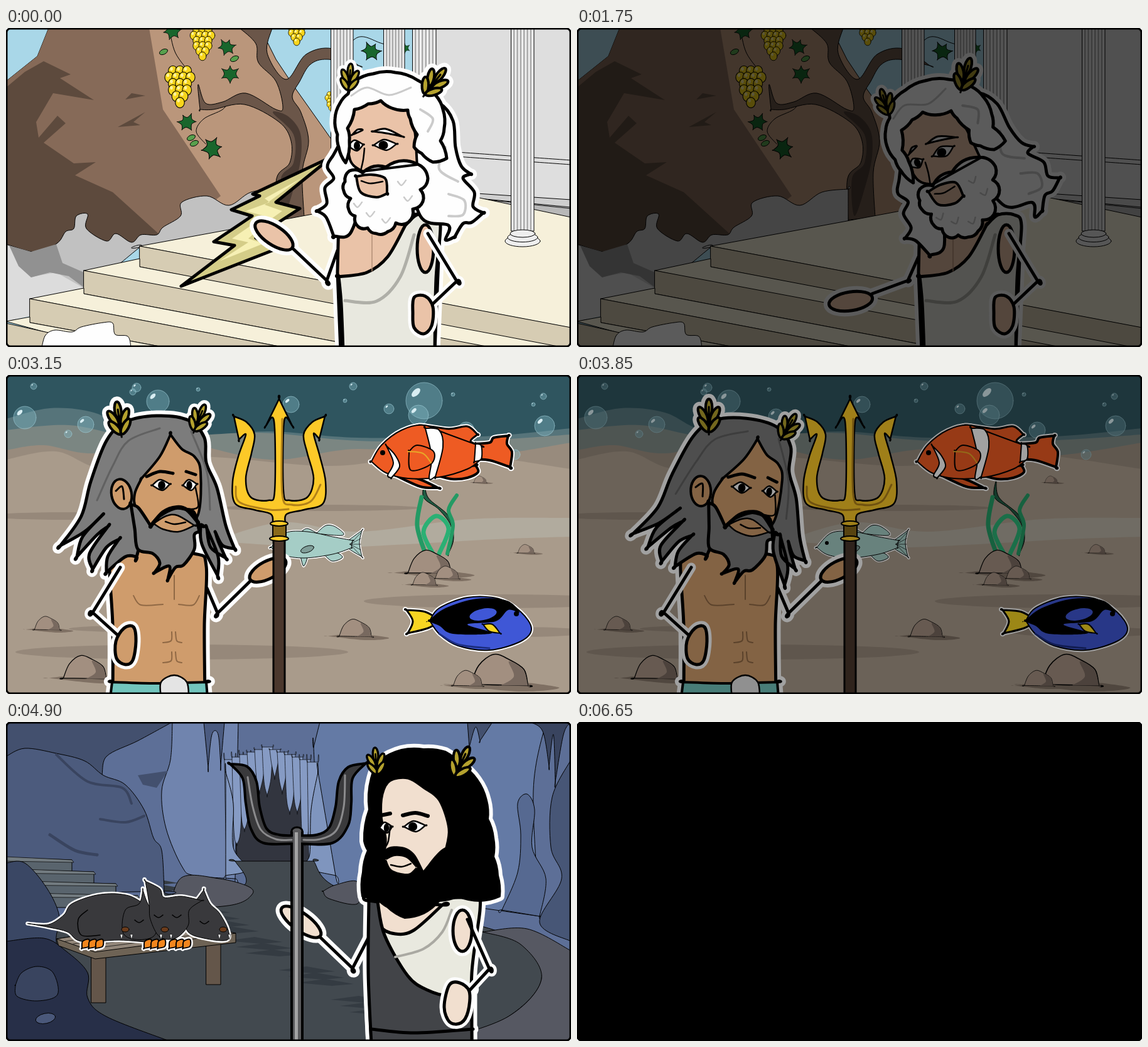
Animation of 900x509 px, one loop 7000 ms. Source, as an HTML page with a canvas:

```html
<!DOCTYPE html>
<html>
<head>
<meta charset="utf-8">
<style>
html, body { margin: 0; width: 100%; height: 100%; overflow: hidden; background: #fff; }
canvas { display: block; }
</style>
</head>
<body>
<canvas id="stage" width="900" height="509"></canvas>
<script>
const ctx = document.getElementById('stage').getContext('2d');
const INK = '#000', WHITE = '#fefefe';
let halo = 0;
ctx.lineJoin = ctx.lineCap = 'round';

// Points are "x,y"; a trailing "!" makes a sharp corner.
const points = d => d.split(' ').flatMap(s => {
  const p = s.replace('!', '').split(',').map(Number);
  return s.endsWith('!') ? [p, p] : [p];
});

function paint(path, fill, width, ink = INK) {
  if (halo) {
    if (!width) return;
    fill = null; ink = WHITE; width += halo * 2;
  }
  if (fill) { ctx.fillStyle = fill; ctx.fill(path); }
  if (width) { ctx.lineWidth = width; ctx.strokeStyle = ink; ctx.stroke(path); }
}

function spline(d, closed) {
  const p = points(d), n = p.length, path = new Path2D();
  const get = i => p[closed ? (i + n) % n : Math.max(0, Math.min(n - 1, i))];
  path.moveTo(...p[0]);
  for (let i = 0; i < n - !closed; i++) {
    const [a, b, c, e] = [get(i - 1), get(i), get(i + 1), get(i + 2)];
    path.bezierCurveTo(b[0] + (c[0] - a[0]) / 6, b[1] + (c[1] - a[1]) / 6,
      c[0] - (e[0] - b[0]) / 6, c[1] - (e[1] - b[1]) / 6, ...c);
  }
  if (closed) path.closePath();
  return path;
}

const blob = (d, fill, width = 1) => paint(spline(d, true), fill, width);
const line = (d, width = 1, ink) => paint(spline(d, false), null, width, ink);
const poly = (d, fill, width = 1) => paint(new Path2D(`M${d}Z`), fill, width);
const rect = (x, y, w, h, fill, width = 0) => poly(`${x},${y}h${w}v${h}h${-w}`, fill, width);

function puff(d, fill, width, bulge) {
  const p = points(d), path = new Path2D();
  path.moveTo(...p[0]);
  p.forEach(([x, y], i) => {
    const [u, v] = p[(i + 1) % p.length];
    path.quadraticCurveTo((x + u) / 2 + (v - y) * bulge, (y + v) / 2 - (u - x) * bulge, u, v);
  });
  paint(path, fill, width);
}

function oval(x, y, rx, ry, fill, width = 0, deg = 0, ink) {
  const path = new Path2D();
  path.ellipse(x, y, rx, ry, deg * Math.PI / 180, 0, 7);
  paint(path, fill, width, ink);
}

function place(x, y, deg, scale, fn) {
  ctx.save();
  ctx.translate(x, y);
  ctx.rotate(deg * Math.PI / 180);
  ctx.scale(scale, scale);
  fn();
  ctx.restore();
}
const shift = (x, y, fn) => place(x, y, 0, 1, fn);
const turn = (x, y, deg, fn) => place(x, y, deg, 1, () => shift(-x, -y, fn));

function outlined(size, fn) {
  halo = size; fn();
  halo = 0; fn();
}

function laurel(x, y, deg, scale) {
  place(x, y, deg, scale, () => {
    for (const [u, v, a] of [[0, -19, 0], [-9, -8, -28], [9, -8, 28], [-8, 7, -36], [8, 7, 36]])
      oval(u, v, 5, 13, '#b5a22e', 4, a);
    line('0,-20 0,22', 3);
  });
}

function eye(x, y, rx, look) {
  blob(`${x - rx},${y}! ${x - 2},${y - 9} ${x + rx},${y - 2}! ${x + 2},${y + 8}`, WHITE, 2.5);
  oval(x + look, y, rx * .42, 7, INK);
}

// ---------- sky scene ----------
function grapes(x, y, s) {
  place(x, y, 0, s, () => [3, 4, 3, 3, 2, 1].forEach((n, row) => {
    for (let i = 0; i < n; i++) {
      const u = (i - (n - 1) / 2) * 10, v = row * 9 - 20;
      oval(u, v, 6.5, 7.5, '#f8d51c', 1);
      oval(u - 2, v - 3, 2, 2.5, '#fff3a0');
    }
  }));
}

const vineLeaf = (x, y, deg, s) => place(x, y, deg, s, () =>
  blob('0,-14! 5,-7 15,-9! 11,0 15,8! 6,8 0,17! -6,8 -15,8! -11,0 -15,-9! -5,-7', '#19662c'));

function column(x, w, bottom) {
  rect(x, -2, w, bottom + 2, '#f0f0f0', 1);
  for (let i = 0; i < 6; i++) rect(x + 3 + i * (w - 4) / 6, 0, 2.5, bottom, '#aaa');
  for (const i of [2, 1, 0]) oval(x + w / 2, bottom + 4 + i * 6, 20 + i * 4, 6 + i * 1.5, '#eee', 1);
}

function olympus() {
  const sky = '#a9d7e8', shade = '#5d4a3d', top = '#f6f0da', side = '#d6ccb3';
  rect(0, 0, 900, 509, sky);
  poly('0,85 50,45 68,0 405,0 430,50 460,95 520,180 520,310 0,360', '#ba967b');
  poly('0,85 50,45 68,0 228,0 250,130 342,268 240,345 0,360', '#866a58', 0);
  poly('0,95 30,70 60,53 103,74 86,80 140,115 75,104 48,150 52,175 82,140 95,152 60,183 108,216 143,214 110,235 170,262 245,330 200,346 110,340 60,365 0,345', shade, 0);
  poly('200,104 222,108 190,114', shade, 0);
  poly('178,158 222,134 203,150 214,155', shade, 0);
  rect(518, 0, 382, 305, '#dedede');
  rect(553, 0, 50, 290, sky);
  rect(635, 0, 14, 290, sky);
  line('690,196 900,211');
  line('690,203 900,218');
  poly('690,260 900,274 900,286 690,266', '#cfcfcf');
  poly('690,266 900,288 900,304 690,288', '#b8b8b8');
  line('260,0 270,40 296,75');
  line('355,115 345,130 315,145 303,165 318,185');
  line('525,55 560,15 600,25 640,35');
  blob('432,306! 431,240 452,215 454,180 435,150 380,122 330,130 309,130! 306,90 318,120 345,118 382,104 430,130 441,126 430,85 402,55 398,25 372,0! 424,0! 416,40 446,82 478,42 520,33 562,60! 512,50 485,58 468,85 456,110 470,135 482,180 472,230 475,303!', '#6b5649');
  blob('460,250 470,205 468,165 448,140 425,135 458,170 458,215 438,240 442,300', '#493a32', 0);
  grapes(313, 22, .92); grapes(277, 91, 1.12); grapes(463, 2, .8); grapes(521, 118, .6);
  vineLeaf(265, 5, 20, .8); vineLeaf(352, 30, 20, .8); vineLeaf(357, 73, 0, .85); vineLeaf(288, 150, -30, .85);
  vineLeaf(329, 192, 80, 1); vineLeaf(582, 37, 30, .9); vineLeaf(635, 32, 0, .5);
  for (const [x, y] of [[251, 38], [364, 49], [295, 175], [300, 184]]) oval(x, y, 7, 4, '#58a04d', 1, -25);
  blob('0,345! 50,358 82,343 95,325 108,320 112,300 130,297 128,320 160,340 175,328 200,342 215,330 240,330 250,318 278,300 280,278 320,268 355,283 390,262 432,257! 432,312! 213,350! 120,420 0,470!', '#c1c1c1');
  poly('0,346 20,355 20,378 40,397 80,390 124,415 38,460 0,468', '#dcdcdc', 0);
  poly('5,347 40,357 80,345 90,375 124,390 124,414 100,396 70,390 40,398 20,380', '#919191', 0);
  column(518, 35, 290); column(602, 33, 280); column(648, 37, 280);
  poly('213,348 430,308 520,291 740,268 900,302 900,478', top);
  poly('213,348 900,478 900,515 213,381', side);
  poly('124,387 213,368 213,381 900,512 740,509', top);
  poly('124,387 770,509 570,509 124,424', side);
  poly('38,432 124,415 124,424 570,509 440,509', top);
  poly('38,432 440,509 250,509 38,470', side);
  poly('0,468 38,461 38,470 250,509 150,509', top);
  poly('0,471 170,509 0,509', side);
  column(805, 36, 324);
  blob('57,509! 63,490 78,482 105,485 120,477 155,470 170,471 174,489 194,492 199,509!', WHITE);
}

function bolt() {
  poly('520,205 393,265 404,268 359,290 392,300 331,341 364,347 279,412 432,352 398,335 422,318 468,288 430,278', '#d4cd88', 5);
  poly('470,240 412,272 420,278 382,292 412,300 360,336 386,342 340,372 410,344 386,336 412,312 440,292 412,282', '#f6f0b4', 0);
}

function zeusHead() {
  const skin = '#eac3a8', grey = '#cbcbcb';
  blob('655,115 690,120 712,148 716,190 725,220 740,233! 728,240 746,262 744,285 760,295! 742,310 728,312 715,333! 700,338 705,315 660,300 640,200', WHITE, 5);
  blob('545,175 520,205 512,222 522,240 508,255 511,280 496,292! 510,302 522,332! 550,325 570,240', WHITE, 5);
  line('700,190 690,225 720,245', 4, grey);
  line('705,265 730,275 728,298 705,300', 4, grey);
  oval(683, 192, 8, 15, skin, 4);
  blob('545,150 560,118 600,113 645,140 655,219! 570,230! 548,210', skin, 4);
  eye(557, 188, 12, 2); eye(604, 187, 18, -3);
  blob('552,170! 560,162 568,163', WHITE, 3);
  blob('585,165! 605,161 631,173! 606,168', WHITE, 3);
  line('571,192 569,210 565,228', 2.5);
  puff('540,245 547,228 568,231 605,222 655,217 672,240 660,258 664,277 648,289 641,310 621,311 608,325 590,328 576,319 561,317 556,300 546,290 549,272 538,260', WHITE, 5, .3);
  line('566,229 655,218', 4);
  blob('558,237! 580,234 604,240 607,264! 590,270 565,262', skin, 4);
  line('566,244 580,248 600,245', 2.5);
  for (const [x, y] of [[580, 295], [640, 270], [630, 245], [605, 305], [560, 280]])
    line(`${x - 6},${y} ${x},${y + 6} ${x + 7},${y - 2}`, 2.5, grey);
  puff('530,190 528,170 524,145 532,120 545,105 555,85 585,73 620,71 655,83 685,108 696,130 698,160 692,180 702,208 680,214 662,200 650,190 655,170 644,145 640,131 615,128 597,116 577,121 555,130 544,160 547,180 541,215', WHITE, 5, .13);
  line('550,108 575,95 610,107 645,95', 3, grey);
  line('660,130 680,145 672,165', 4, grey);
  laurel(547, 84, 5, .85);
  laurel(679, 91, 38, 1.05);
}

function zeus(p) {
  const mix = (a, b) => a + (b - a) * p, skin = '#eac3a8', dx = 16 * p;
  outlined(6, () => {
    line(`${528 + dx},${mix(355, 365)} ${511 + dx},403! ${mix(455, 470)},${mix(350, 424)}`, 5);
    oval(mix(427, 436), mix(331, 436), 35, 15, skin, 5, mix(34, -9));
    shift(dx, 0, () => {
      poly('530,305 528,390 533,515 683,515 691,320 655,297', skin, 5);
      blob('530,397! 575,390 608,365 636,315! 655,298 680,298 692,315 685,400 683,515! 537,515! 534,440', '#e8e8df', 5);
      line('540,435 590,436 628,397 650,330', 5, '#afafa8');
      line('583,330 583,388', 1.5, '#b18d75');
      oval(668, 352, 13, 38, skin, 5);
    });
    shift(11 * p, 6 * p, () => turn(600, 270, -22 * p, zeusHead));
  });
  shift(dx, 0, () => outlined(5, () => {
    line('672,328 718,404! 680,440', 5);
    blob('650,430 668,428 680,445 678,475 665,488 650,478 648,455', skin, 5);
  }));
}

function skyScene(k) {
  olympus();
  const t = Math.min(1, k / 5), p = t * t * (3 - 2 * t), fly = Math.max(0, k - 1);
  shift(-240 * fly + 9 * p, 180 * fly + 60 * p, bolt);
  zeus(p);
}

// ---------- sea scene ----------
function stone(x, y, s) {
  place(x, y, 0, s, () => {
    blob('-48,13! 0,9 60,16 20,20', '#7f7063', 0);
    blob('-28,13! -20,-6 -5,-17 10,-12 25,-2 29,14!', '#a28f80');
    blob('2,14! 15,5 10,-10 24,-2 29,14!', '#78695f', 0);
  });
}

function seabed() {
  rect(0, 0, 900, 509, '#a99b8b');
  rect(0, 0, 900, 120, '#2f555f');
  blob('0,70! 70,53 140,60 200,88 300,98 420,90 560,100 760,98 900,85! 900,180! 0,180!', '#56747a', 0);
  blob('0,88! 100,80 220,100 400,92 560,105 740,105 900,95! 900,190! 0,190!', '#7b8682', 0);
  blob('0,120! 60,112 140,125 260,105 420,135 560,118 740,130 900,108! 900,260! 0,260!', '#988b7d', 0);
  blob('0,135! 80,122 160,150 300,130 520,145 700,125 900,150! 900,300! 0,300!', '#a99b8b', 0);
  blob('330,265! 440,235 560,250 740,230 900,228! 900,258! 780,262 640,270 500,275', '#b1ab9e', 0);
  for (const [x, y, w, h] of [[280, 442, 265, 12], [780, 361, 210, 11], [500, 212, 160, 5], [100, 225, 130, 6], [200, 405, 100, 5], [810, 410, 120, 8]])
    oval(x, y, w, h, '#96887a');
  for (const [x, y, r] of [[44, 18, 5], [30, 68, 18], [127, 79, 13], [99, 94, 6], [208, 20, 7], [202, 27, 5], [242, 42, 18], [317, 66, 12], [306, 23, 3], [454, 47, 13], [540, 41, 3], [553, 18, 6], [610, 54, 8], [666, 41, 29], [657, 64, 16], [712, 31, 3], [733, 88, 13], [811, 127, 8], [840, 47, 3], [856, 34, 5], [858, 81, 16]]) {
    oval(x, y, r, r, 'rgba(130,185,198,.4)', 1, 0, 'rgba(160,205,215,.6)');
    oval(x - r * .45, y - r * .45, r * .3, r * .16, '#d8edf2', 0, -45);
  }
  stone(65, 397, .7); stone(125, 468, 1.2); stone(556, 405, .9); stone(785, 473, 1.6); stone(735, 485, .8);
  stone(755, 167, .35); stone(828, 278, .45);
  blob('668,165! 672,195 705,225 713,260 705,285! 710,245 690,215 665,195', '#205c43');
  line('668,285 655,240 662,195', 7, '#249a64');
  line('703,285 712,240 705,215 718,192', 6, '#249a64');
  line('680,285 665,250 685,225 705,245 690,285', 7, '#2bb074');
  stone(674, 300, 1.2); stone(702, 316, .65); stone(666, 326, .65);
}

function clownfish() {
  const orange = '#ee5b23';
  outlined(2, () => {
    blob('650,90! 658,80 705,86 735,82 751,95! 740,105 748,112 725,115', orange, 3);
    blob('620,160! 655,165 688,180! 660,178', orange, 4);
    blob('685,160! 710,150 748,144! 752,155 735,164 710,166', orange, 4);
    blob('740,110! 770,108 777,100 800,97! 798,110 806,123 803,147! 770,136 744,135!', orange, 4);
    blob('582,138! 598,112 630,88 665,80 700,93 757,114! 757,134! 735,150 690,163 640,165 605,156', orange, 2);
  });
  blob('606,113! 620,128 627,146 614,164! 608,160 617,140', WHITE, 2);
  blob('668,85! 690,88 696,115 684,162! 674,165 678,130', WHITE, 2);
  blob('748,110! 757,113 757,134 746,138!', WHITE, 2);
  blob('642,122! 655,112 681,122 677,142 645,152', orange, 2);
  line('640,122 664,125 677,140', 2, '#e8a827');
  oval(600, 124, 4, 4, INK);
}

function tang() {
  const blue = '#3f57d6';
  outlined(2, () => {
    blob('638,375! 668,378 692,392! 672,404 640,412! 648,393', '#f7d522', 3);
    blob('675,392! 690,372 735,355 785,357 820,378 837,405 820,425 770,439 720,432 690,413', blue, 2);
  });
  blob('672,393! 700,372 750,357 798,360 818,379 800,375 780,393 735,398 774,412 712,413 690,400', INK, 0);
  oval(760, 382, 22, 9, blue, 0, -12);
  blob('760,398! 775,398 787,412! 770,409', '#f7d522', 2);
  line('690,413 720,430 770,436', 3, '#1b2d80');
  oval(813, 381, 4, 4, INK);
}

function bass() {
  const green = '#a5cdc6';
  outlined(1.5, () => {
    blob('470,250! 480,245 495,252! 510,240 526,243 535,256', green);
    blob('468,285! 474,305 480,288', green);
    blob('508,288! 520,297 536,291 525,283', green);
    blob('545,264! 567,248! 563,268 567,290! 545,276', green);
    blob('422,275! 445,252 480,250 520,258 552,264! 550,276! 520,286 475,292 440,287', green);
  });
  for (let i = 0; i < 5; i++) line(`548,270 565,${252 + i * 9}`, .7);
  oval(480, 278, 11, 5, '#7f9d98', 1, -20);
  oval(438, 268, 3, 3, INK);
}

function poseidonHead() {
  const skin = '#cf9c6c', grey = '#7c7c7c', dim = '#616161';
  blob('240,65 190,75 160,105 135,170 120,225 87,272! 125,250 152,225! 122,258 113,290! 145,255 162,242! 133,285 138,310! 160,275 180,262! 162,290 160,315! 190,290 208,290! 240,200 310,240! 312,270 337,320! 338,290 320,245! 326,275 350,292! 338,265 334,252! 345,272 364,277! 350,240 336,180 319,140 316,100 290,72', grey, 5);
  line('245,85 195,105 170,145 145,200', 3, dim);
  line('295,90 320,155 325,215', 3, dim);
  blob('262,95! 245,130 216,165! 205,190 208,215 235,255 270,245 305,225 310,155 300,130 280,118', skin, 4);
  oval(184, 190, 16, 24, skin, 4, -10);
  line('175,185 185,178 188,198', 3);
  blob('199,207! 211,212 230,240! 245,225 268,213 285,214 300,220 308,250! 300,255 300,278 283,303 270,307 258,326! 260,305 237,315! 245,300 234,285 210,278 205,245', grey, 5);
  blob('235,237! 255,225 273,224 300,240! 275,250 250,246', skin, 2.5);
  line('230,242 250,219 272,211 288,215 306,235', 6);
  line('254,234 268,238 286,235', 2.5);
  eye(247, 176, 14, 1); eye(293, 176, 11, -1);
  line('224,162 245,154 266,157', 5);
  line('287,154 302,159', 5);
  line('302,180 306,210 290,214', 2.5);
  laurel(181, 76, -8, 1.05); laurel(306, 74, 22, .9);
}

function trident() {
  const gold = '#fcc928', bronze = '#b18119';
  rect(426, 258, 18, 260, '#4b382d', 3);
  blob('435,38! 456,81! 443,74 442,185 452,200 480,195 490,165 480,125 474,95 488,75 508,66! 499,102! 490,94 500,130 509,170 505,205 475,215 447,222 445,237! 425,237! 422,222 395,215 365,205 361,170 370,130 382,95 371,103! 363,66! 383,75 396,95 391,125 382,165 390,195 418,200 428,185 427,74 414,81!', gold, 2.5);
  line('440,70 440,190 455,207 485,202 501,175', 3, bronze);
  line('366,178 372,203 420,215 450,214', 3, bronze);
  rect(425, 240, 21, 21, '#8a6a1a', 2);
  oval(435, 237, 14, 4, gold, 2);
  oval(435, 261, 15, 4, gold, 2);
}

function poseidon(deg) {
  const skin = '#cf9c6c', fold = '#8f6844';
  outlined(6, () => {
    line('320,340 337,380! 392,326', 5);
    oval(417, 311, 32, 14, skin, 5, -28);
    blob('165,300 178,285 205,279 300,285 319,305 316,400 317,515! 170,515! 170,400', skin, 5);
    blob('169,490! 240,492 319,490! 321,515! 166,515!', '#72c5bd', 4);
    turn(225, 282, deg, poseidonHead);
  });
  line('203,352 215,367 250,366', 2, fold);
  line('275,366 298,367 308,352', 2, fold);
  line('268,320 268,358', 2, fold);
  for (const y of [410, 442]) {
    line(`264,${y} 263,${y + 14} 250,${y + 17}`, 2, fold);
    line(`270,${y} 272,${y + 14} 280,${y + 17}`, 2, fold);
  }
  blob('247,515! 247,490 268,479 288,490 291,515!', '#e4e4e4', 2.5);
  outlined(5, () => {
    line('182,307 138,379! 180,417', 5);
    blob('188,404 203,402 207,425 202,455 190,462 176,452 175,425', skin, 5);
  });
  trident();
}

function seaScene(k) {
  seabed();
  const swim = 20 * (k - 2);
  shift(-swim, 0, bass);
  shift(-swim, 0, clownfish);
  shift(swim, 0, tang);
  poseidon(Math.max(0, k - 2) * 4);
}

// ---------- cave scene ----------
function cave() {
  const dark = '#43506e', shade = '#39445f', path = '#565862', ice = '#7f95be';
  rect(0, 0, 900, 509, '#5d6f97');
  blob('0,0! 265,0! 210,30 160,55 150,90 120,70 0,70!', dark);
  blob('265,0! 262,60 248,110 255,170 280,230 300,245 365,250! 370,0!', '#7084ae');
  blob('490,40! 500,0! 860,0! 840,110 850,310! 500,260!', '#647aa5');
  blob('315,0! 322,72! 328,20 338,20 342,70! 348,0!', '#4b5b80');
  blob('735,0! 738,40! 748,8 755,30! 775,0!', dark);
  blob('790,300! 815,240 820,180 815,130 830,115 842,140 838,200 860,250 850,310!', '#566991');
  blob('835,0! 855,15 865,70! 872,20 875,95! 888,20 900,0!', shade);
  blob('900,60! 870,120 868,200 885,250 850,320 900,350!', '#475676');
  poly('210,85 258,78 240,105 218,100', dark, 0);
  blob('368,225! 366,130 385,75 430,55 475,80 492,130 486,225!', '#32353f');
  for (let i = 0; i < 12; i++) {
    const x = 356 + i * 12, top = 40 + Math.abs(i - 5) * 4, end = 66 + (i - 5.5) ** 2 * 4.6 + i % 3 * 14;
    blob(`${x - 8},${top}! ${x - 5},${end} ${x},${end + 22}! ${x + 6},${end - 5} ${x + 9},${top}!`, '#869bc4', .7);
  }
  blob('350,80! 362,130 362,200 385,235 350,245!', ice);
  blob('497,80! 486,140 484,210 476,232 525,245!', ice);
  blob('365,222! 490,222! 530,265 700,310 820,350 853,410 800,470 700,509! 160,509! 85,400 100,300 300,290 380,260', '#42494f');
  for (let i = 0; i < 17; i++) {
    const x = 230 + i * 83 % 400, y = 255 + i * 47 % 225;
    poly(`${x - 45},${y} ${x},${y - 6} ${x + 45},${y + 2} ${x + 10},${y + 5}`, '#343b42', 0);
  }
  blob('260,300! 360,292 392,275 385,262 340,250 280,248', path);
  blob('505,270! 515,282 560,290 560,255 525,260', path);
  blob('760,335! 820,355 853,410 800,470 690,509! 900,509! 900,365! 830,330', path);
  blob('0,55! 30,42 80,50 125,62 155,85 190,100 220,140 235,185 248,205 252,270! 0,275!', '#4c5b7d');
  line('80,52 130,95 185,105 200,130', 4, shade);
  line('150,155 190,160 220,150', 4, shade);
  line('70,180 110,205 145,212', 5, shade);
  for (let i = 0; i < 4; i++) {
    const x = 105 + i * 35, y = 220 + i * 19;
    poly(`0,${y - 4} ${x},${y} ${x},${y + 19} 0,${y + 19}`, '#59646d');
    poly(`0,${y - 5} ${x},${y} ${x + 3},${y + 4} 0,${y + 2}`, '#727b80', .7);
  }
  blob('0,225! 30,225 65,265 85,310 80,350 95,400 50,430 0,430!', '#3a4764');
  blob('0,350! 60,345 95,365 130,400 130,440 160,470 260,509! 0,509!', '#272f48');
  blob('15,420! 25,400 50,390 75,400 82,435 50,445 18,438', shade);
  oval(63, 473, 16, 8, '#4a587a', 1, -12);
}

function table() {
  rect(136, 372, 23, 76, '#64564a', 1);
  rect(319, 350, 23, 69, '#64564a', 1);
  poly('81,346 260,318 366,337 366,352 142,378 84,357', '#6e6355');
  poly('81,346 260,318 366,337 142,367', '#93877a');
  for (let i = 1; i < 5; i++) line(`${81 + i * 13},${346 + i * 4} ${260 + i * 21},${318 + i * 4}`, .7);
}

const FUR = '#39393c', NOSE = '#6b3c1c';
function paw(x, y) {
  for (const u of [x - 16, x - 5, x + 6])
    blob(`${u},${y + 8}! ${u + 1},${y - 3} ${u + 11},${y - 6} ${u + 11},${y + 5}`, '#f2861d', 2);
}

function sleepingDog() {
  outlined(2.5, () => {
    blob('38,322! 68,323 92,308 105,290 145,276 185,275 215,287 270,330 240,350 180,348 120,350 98,335 70,328', FUR);
    blob('218,268! 226,290 242,315 235,342 205,347 186,335 190,300 212,290', FUR);
    blob('315,268! 325,290 340,305 354,332 352,348 320,346 290,335 285,305 300,288', FUR);
    blob('222,254! 245,266 252,280 280,278 312,285! 292,300 290,325 270,345 245,343 230,315 228,290', FUR);
    paw(137, 353); paw(236, 353); paw(276, 353);
  });
  line('150,340 120,340 115,315 130,300', 1.5);
  for (const [x, y] of [[212, 318], [243, 310], [272, 310], [316, 320]]) line(`${x - 7},${y - 2} ${x},${y + 2} ${x + 7},${y - 2}`, 1.5);
  for (const x of [190, 253, 346]) {
    oval(x, 331, 6, 4, NOSE, 1);
    for (const u of [x - 8, x + 8]) poly(`${u},339 ${u + 4},339 ${u + 2},347`, WHITE, .5);
  }
}

function snarl(x, y, s, deg) {
  place(x, y, deg, s, () => {
    oval(0, 1, 7, 5, NOSE, 1);
    blob('-14,10! 0,8 14,10! 8,23 -8,23', '#b9362a', 1.5);
    for (const m of [-1, 1]) {
      poly(`${m * 10},-14 ${m * 23},-19 ${m * 20},-11`, WHITE);
      oval(m * 16, -14, 2.5, 3, '#c52c20');
      poly(`${m * 12},8 ${m * 7},8 ${m * 9},17`, WHITE, .5);
    }
  });
}

function standingDog() {
  outlined(2.5, () => {
    blob('195,235 212,245 210,290 238,318! 222,322 198,290', FUR);
    paw(237, 318); paw(133, 329); paw(207, 363); paw(315, 348);
    blob('113,156! 126,178 148,182 165,174 200,178 230,190 320,190 305,225 298,260 300,300 312,345! 296,345! 283,310 272,272 238,276 228,320 231,360! 202,360! 212,310 212,252 176,247 165,262 156,295 155,327! 126,327! 140,280 140,220 142,196 124,185', FUR);
    blob('228,108! 240,125 258,145 255,175 240,195 222,187 214,170 220,140', FUR);
    blob('355,136! 355,165 352,192 345,215 333,223 318,205 313,175 338,155', FUR);
    blob('236,117! 262,127 285,125 312,129 335,116! 326,148 314,175 297,194 275,194 258,175 248,148', FUR);
  });
  line('212,250 213,220 220,200', 1.5);
  snarl(231, 173, .8, -10); snarl(335, 199, .8, 16); snarl(286, 171, 1, 0);
}

function bident() {
  rect(455, 175, 17, 340, '#59595b', 4);
  blob('357,67! 384,71 399,95 404,135 415,170 435,180 463,181 495,180 515,168 525,135 530,95 545,72 573,66! 552,90 550,130 545,165 520,193 463,194 410,193 390,170 382,130 377,90', '#3a3a3c', 4);
  line('385,88 393,135 406,172 430,187 455,188', 3, '#8b8b8d');
  line('540,85 538,135 526,173 500,187 474,188', 3, '#8b8b8d');
  oval(463.5, 174, 8.5, 6, '#59595b', 3);
  rect(457, 172, 13, 337, '#59595b');
  rect(460, 176, 5, 333, '#a3a3a3');
}

function hades() {
  const skin = '#f1dfcf';
  outlined(6, () => {
    line('577,345 552,393! 500,343', 5);
    oval(470, 319, 38, 14, skin, 5, 36);
    blob('580,285! 720,280 750,282 755,300 742,400 742,515! 582,515! 578,400', '#e9e9df', 5);
    blob('592,285! 596,325 620,338 650,332 695,292!', skin, 5);
    blob('578,285! 592,287! 603,340 640,405 672,428 706,437 742,430! 742,515! 582,515! 577,400', '#424448', 5);
    line('582,490 650,496 744,490', 5);
    line('620,375 665,362 695,335 710,300', 4, '#aaa9a2');
    puff('579,140 582,90 595,62 630,45 665,44 700,48 725,68 750,92 765,125 767,155 776,185 776,215 783,245 786,278 755,285 720,278 690,285 665,305 635,312 608,295 590,280 568,278 569,240 577,205 571,190', INK, 4, .1);
  });
  blob('598,150 600,115 612,94 640,90 665,105 690,125 705,170 700,205! 680,232 650,241 612,235 604,210 605,185', skin, 3);
  blob('600,235! 605,203 630,199 650,210 665,237! 700,200 735,215 720,260 660,300 610,285', INK, 0);
  blob('606,220! 620,214 638,217 653,232! 640,242 615,236', skin, 0);
  line('613,228 630,231 645,226', 2.5);
  eye(651, 167, 17, -3); eye(605, 169, 10, 1);
  line('632,149 652,145 672,150', 6);
  line('597,149 612,146', 6);
  line('612,165 609,190 604,200', 2.5);
  laurel(590, 68, -5, .85);
  laurel(723, 70, 25, 1.05);
  outlined(5, () => {
    oval(727, 333, 15, 33, skin, 5);
    line('735,315 770,394! 735,432', 5);
    blob('706,420 722,416 738,430 736,462 725,480 707,479 698,455', skin, 5);
  });
  bident();
}

function caveScene(k) {
  cave();
  table();
  if (k < 2) sleepingDog(); else standingDog();
  hades();
}

// ---------- timeline ----------
const STEP = 350, LIGHT = [0, .36, .63];
const scenes = [[skyScene, 0, 7], [seaScene, 7, 7], [caveScene, 14, 6]];

function render(step) {
  const [scene, start, length] = scenes.find(([, s, n]) => step < s + n);
  const k = step - start;
  scene(k);
  ctx.fillStyle = `rgba(0,0,0,${1 - (LIGHT[length - 1 - k] ?? 1)})`;
  ctx.fillRect(0, 0, 900, 509);
  const frame = new Path2D(), corners = new Path2D();
  frame.roundRect(1, 1, 898, 507, 6);
  corners.rect(0, 0, 900, 509);
  corners.roundRect(0, 0, 900, 509, 6);
  ctx.fillStyle = '#fff';
  ctx.fill(corners, 'evenodd');
  paint(frame, null, 3);
}

let shown = -1;
const begin = performance.now();
function tick() {
  const step = Math.floor((performance.now() - begin) / STEP) % 20;
  if (step !== shown) render(shown = step);
  requestAnimationFrame(tick);
}
tick();
</script>
</body>
</html>
```
